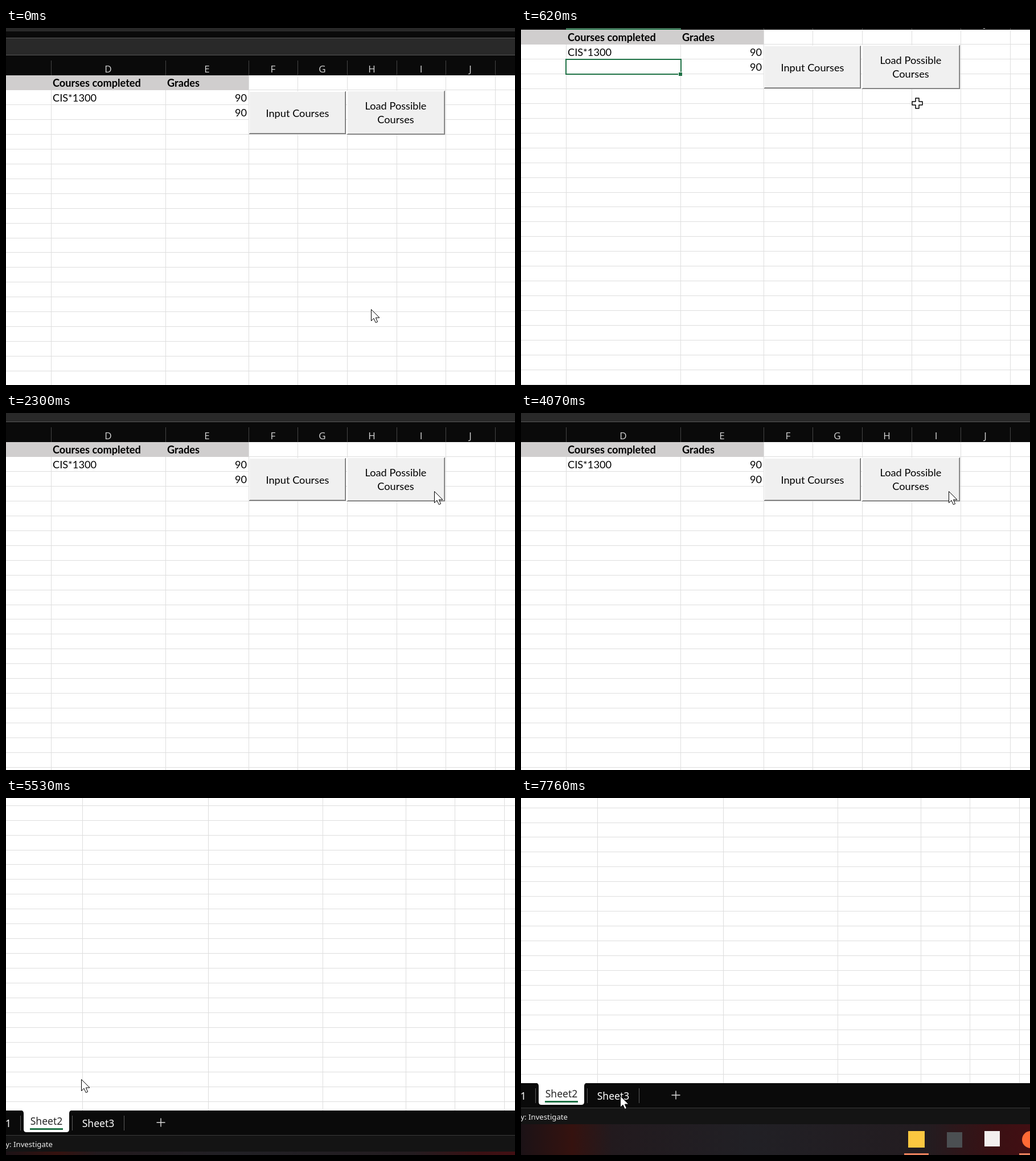
Recreate the animation shown at these times as an HTML page. Size 894 by 626 pixels, loop 8000 ms.

```html
<!DOCTYPE html>
<html lang="en">
<head>
<meta charset="utf-8">
<title>Course sheet</title>
<style>
  html, body { margin: 0; width: 100%; height: 100%; overflow: hidden; background: #fff; }
  svg { position: absolute; left: 0; top: 0; display: block; }
  text { white-space: pre; }
  .cell { font: 18.2px Lato, "Open Sans", sans-serif; fill: #000; }
  .bold { font-weight: 700; }
  .head { font: 17px "Open Sans", "Noto Sans", sans-serif; fill: #d6d6d6; text-anchor: middle; }
  .tab { font: 17.5px "Noto Sans", "Open Sans", sans-serif; fill: #fff; }
  .status { font: 13.2px "Noto Sans", "Open Sans", sans-serif; fill: #eee; text-anchor: end; }
  .mid { text-anchor: middle; }
  .end { text-anchor: end; }
  .crisp { shape-rendering: crispEdges; }
</style>
</head>
<body>
<svg width="894" height="626" viewBox="0 0 894 626">
  <defs>
    <linearGradient id="glow">
      <stop offset="0" stop-color="#1b1216"/>
      <stop offset=".1" stop-color="#35120f"/>
      <stop offset=".18" stop-color="#221a1e"/>
      <stop offset=".45" stop-color="#212025"/>
      <stop offset=".8" stop-color="#231c20"/>
      <stop offset=".93" stop-color="#3a1013"/>
      <stop offset="1" stop-color="#420f13"/>
    </linearGradient>
  </defs>
  <g id="world">
    <g class="crisp">
      <rect x="-300" width="1220" height="83" fill="#0a0a0a"/>
      <rect x="-300" width="1220" height="6" fill="#292929"/>
      <rect x="-300" y="17" width="1220" height="31" fill="#575757"/>
      <rect x="-300" y="18" width="1220" height="29" fill="#292929"/>
      <path id="grid" fill="none" stroke="#dedede"/>
      <path id="seps" fill="none" stroke="#454545"/>
      <rect x="-300" y="83" width="726" height="26" fill="#d0cece"/>
    </g>
    <text x="240" y="-4" class="head">g</text>
    <g id="headSel" class="crisp">
      <rect x="79" y="57" width="202" height="25" fill="#666"/>
      <rect x="79" y="81" width="202" height="2" fill="#1e7145"/>
    </g>
    <g id="letters"></g>
    <text class="cell bold" x="82" y="103">Courses completed</text>
    <text class="cell bold" x="283" y="103">Grades</text>
    <text class="cell" x="82" y="129">CIS*1300</text>
    <text class="cell end" x="423" y="129">90</text>
    <text class="cell end" x="423" y="155">90</text>
    <g id="cellSel" class="crisp">
      <rect x="79" y="135" width="202" height="26" fill="none" stroke="#1e7145" stroke-width="2"/>
      <rect x="276" y="157" width="7" height="7" fill="#fff"/>
      <rect x="277" y="158" width="6" height="6" fill="#1e7145"/>
    </g>
    <g id="buttons" class="crisp"></g>
    <text class="cell mid" x="512" y="156">Input Courses</text>
    <text class="cell mid" x="684.5" y="143">Load Possible</text>
    <text class="cell mid" x="684.5" y="167">Courses</text>

    <g transform="translate(-276 277)">
      <rect y="548" width="1180" height="43" fill="#0a0a0a"/>
      <path d="M26 547.5Q31 548 31 553V581q0 5 5 5H106q5 0 5-5V553Q111 548 116 547.5Z" fill="#fff"/>
      <path class="crisp" d="M25.5 557V583M116.5 557V583M207.5 557V583" stroke="#5a5a5a"/>
      <path d="M264.5 569H279.5M272 561.5V576.5" stroke="#ddd" stroke-width="1.4"/>
      <text class="tab end" x="9" y="577">Sheet1</text>
      <text class="tab mid" x="71" y="573" style="fill:#262626;font-weight:500">Sheet2</text>
      <rect class="crisp" x="42" y="579" width="58" height="3" fill="#1e7145"/>
      <text class="tab mid" x="162" y="577">Sheet3</text>
      <g class="crisp">
        <rect y="591" width="1180" height="30" fill="#141414"/>
        <rect y="591" width="1180" height="1" fill="#3a3a3a"/>
        <rect y="620" width="894" height="60" fill="url(#glow)"/>
        <rect x="894" y="620" width="286" height="60" fill="#420f13"/>
        <rect x="673" y="671" width="43" height="3" fill="#e8805c"/>
        <rect x="875" y="671" width="43" height="3" fill="#e8805c"/>
      </g>
      <text class="status" x="82" y="612">Accessibility: Investigate</text>
      <rect x="680" y="632" width="29" height="29" fill="#fcc740"/>
      <rect x="748" y="634" width="27" height="27" fill="#4b4f52"/>
      <rect x="814" y="632" width="27" height="27" fill="#f3efee"/>
      <circle cx="895" cy="647" r="15" fill="#ff6a35"/>
    </g>
  </g>
  <g id="pointer" fill="#fff" stroke="#000" stroke-linejoin="round">
    <path id="arrow" d="M.5 .5V20.5L5 16.2L8.3 23.6L11.6 22.2L8.4 15H15Z"/>
    <path id="cross" stroke-width="1.5" d="M-3-9H3V-3H9V3H3V9H-3V3H-9V-3H-3Z"/>
    <path id="hand" stroke-width="1.2" d="M-2 1Q0-1.5 2 1V9Q4.5 7 6 9.5Q8.5 8 9.5 10.5Q12.5 9.5 12.8 13V18Q12.5 22 10 26H-1Q-3 21-7.5 16.5Q-9 13.5-6 13.5Q-4 14-2 16.5ZM2 9V13M6 9.5V13.5M9.5 10.5V14"/>
  </g>
</svg>
<script>
const LOOP = 8000, STEP = 10;
const el = id => document.getElementById(id);
const show = (id, on) => { el(id).style.display = on ? "" : "none"; };

// Sheet parts
const cols = [-142, 79, 280, 426, 512, 599, 686, 772, 859];
let grid = "", seps = "";
for (const x of cols) {
  grid += `M${x + .5} 83V825`;
  seps += `M${x + .5} 57V83`;
}
for (let i = 0; i < 28; i++) grid += `M-300 ${Math.round(108 + 25.95 * i) + .5}H920`;
el("grid").setAttribute("d", grid);
el("seps").setAttribute("d", seps);
el("letters").innerHTML = [..."CDEFGHIJ"].map((c, i) =>
  `<text class="head" x="${(cols[i] + cols[i + 1]) / 2}" y="77.5">${c}</text>`).join("");

const button = (x, y, w, h) => `
  <rect x="${x}" y="${y}" width="${w}" height="${h}" fill="#696969"/>
  <rect x="${x}" y="${y}" width="${w - 1}" height="${h - 1}" fill="#fff"/>
  <rect x="${x + 1}" y="${y + 1}" width="${w - 2}" height="${h - 2}" fill="#a0a0a0"/>
  <rect x="${x + 1}" y="${y + 1}" width="${w - 3}" height="${h - 3}" fill="#f0f0f0"/>`;
el("buttons").innerHTML = button(427, 111, 170, 75) + button(599, 110, 172, 77);

// Pointer path on the sheet: time, x, y
const path = [
  [0, 641, 493], [200, 660, 623], [620, 696, 212], [820, 708, 168],
  [1020, 721, 166], [1200, 735, 164], [1350, 752, 178], [1530, 752, 178],
  [1690, 752, 169], [4050, 752, 169], [4070, 751, 169], [4760, 430, 357],
  [5190, 430, 357], [5530, -144, 770], [5980, -121, 839], [6180, -106, 855],
  [6570, -106, 855], [6610, -104, 850], [7030, -104, 850], [7130, -102, 847], [8000, -102, 847]
];
const slope = (i, k) => path[i + 1] ? (path[i + 1][k] - path[i][k]) / (path[i + 1][0] - path[i][0]) : 0;
function tangent(i, k) {
  if (!i) return slope(0, k);
  const a = slope(i - 1, k), b = slope(i, k);
  return a * b > 0 ? 2 * a * b / (a + b) : 0;
}
function along(t, k) {
  let i = 0;
  while (i < path.length - 2 && t >= path[i + 1][0]) i++;
  const [p, q] = [path[i], path[i + 1]];
  const d = q[0] - p[0], u = (t - p[0]) / d, v = 1 - u;
  return p[k] * v * v * (1 + 2 * u) + q[k] * u * u * (3 - 2 * u)
    + d * u * v * (v * tangent(i, k) - u * tangent(i + 1, k));
}

// The view is pushed along when the pointer nears an edge
const views = [];
let vx = 0, vy = 0;
for (let t = 0; t <= LOOP; t += STEP) {
  const x = along(t, 1), y = along(t, 2);
  vx = Math.max(-276, Math.min(Math.max(vx, x - 762), x - 132));
  vy = Math.min(325, Math.min(Math.max(vy, y - 493), y - 132));
  views.push([Math.round(vx), Math.round(vy)]);
}

function draw(t) {
  const at = Math.floor(t / STEP) * STEP;
  const [cx, cy] = views[at / STEP];
  const x = Math.round(along(at, 1)), y = Math.round(along(at, 2));
  el("world").setAttribute("transform", `translate(${-cx} ${-cy})`);
  el("pointer").setAttribute("transform", `translate(${x - cx} ${y - cy})`);
  const active = t >= 200 && t < 2300;
  const selected = active || t >= 4400;
  show("headSel", selected);
  show("cellSel", selected);
  const over = x > 599 && x < 771 && y > 110 && y < 187;
  show("arrow", !active);
  show("hand", active && over);
  show("cross", active && !over);
}

const start = performance.now();
function tick() {
  draw((performance.now() - start) % LOOP);
  requestAnimationFrame(tick);
}
tick();
</script>
</body>
</html>
```
